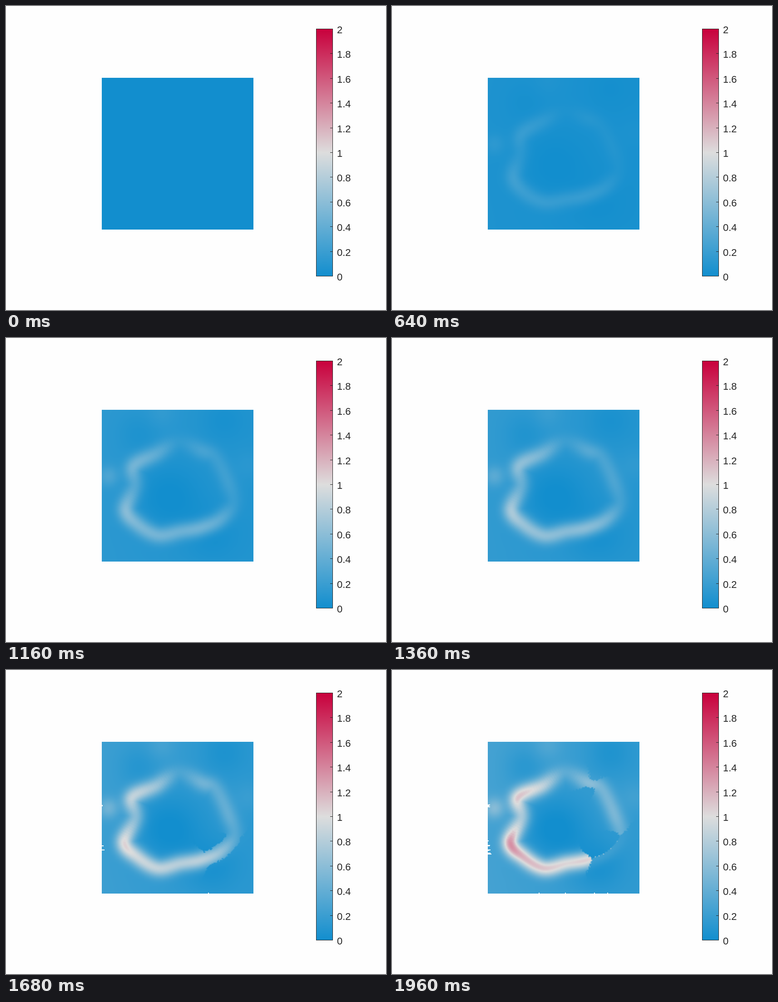
An HTML page with a canvas that plays this animation: 837x669 px, repeating every 2 s.

```html
<!DOCTYPE html>
<html lang="en">
<head>
<meta charset="utf-8">
<title>Field with colour scale</title>
<style>
  html, body { margin: 0; width: 100%; height: 100%; overflow: hidden; background: #fefefe; }
  #field { position: absolute; left: 211px; top: 158px; width: 334px; height: 334px; }
  svg { position: absolute; left: 0; top: 0; }
  text { font: 22px "Liberation Sans", Arial, sans-serif; fill: #262626; }
</style>
</head>
<body>
<canvas id="field" width="334" height="334"></canvas>
<svg width="837" height="669" viewBox="0 0 837 669">
  <defs>
    <linearGradient id="scale" x1="0" y1="1" x2="0" y2="0">
      <stop offset="0" stop-color="rgb(18,142,206)"/>
      <stop offset=".5" stop-color="rgb(221,221,221)"/>
      <stop offset="1" stop-color="rgb(200,0,60)"/>
    </linearGradient>
  </defs>
  <rect x="683.5" y="50.5" width="36" height="544" fill="url(#scale)" stroke="#262626"/>
  <g id="ticks" stroke="#262626"></g>
  <g id="labels"></g>
</svg>
<script>
const LOOP = 2000, STEP = 40, LAST = 1960;
const LEFT = 211, TOP = 158, SIZE = 334, CELLS = SIZE / 2;
const CENTRE = { x: 385, y: 340 };
const LOW = [18, 142, 206], MID = [221, 221, 221], HIGH = [200, 0, 60];
const SIGMA = 13.5, PER_NODE = 12;

// Key points of the ridge, clockwise from the top: x, y, final height
const ridge = [
  [380, 226, .38], [432, 248, .6], [462, 262, .5], [490, 318, .52], [502, 364, .45],
  [472, 400, .85], [430, 418, 1.06], [385, 426, 1.04], [335, 436, 1.12], [290, 412, 1.2],
  [261, 379, 1.34], [284, 325, .76], [278, 281, 1.12], [330, 255, .88]
];

// Broad rises and dips of the ground: x, y, radius, height
const bumps = [
  [355, 350, 56, -.22], [478, 182, 34, -.1], [452, 430, 42, -.13], [290, 212, 30, -.1],
  [343, 165, 22, .1], [226, 304, 16, .34], [535, 280, 24, .08]
];

// Stretches of the ridge that tear, in key point units, with the half width left over
const tears = [
  { from: 4, to: 5.75, start: 1600, end: 1800, left: 0 },
  { from: 1, to: 1.5, start: 1740, end: 1860, left: 9 }
];

const clamp = (v, a = 0, b = 1) => Math.min(b, Math.max(a, v));
const mix = (a, b, k) => a + (b - a) * k;
const ramp = (t, a, b) => clamp((t - a) / (b - a));
const fromCentre = (x, y) => Math.hypot(x - CENTRE.x, y - CENTRE.y);
const noise = n => { const v = Math.sin(n) * 437.58; return v - Math.floor(v); };
const jag = (x, y) => 4 * noise(Math.floor(x / 5) * 12.99 + Math.floor(y / 4) * 78.23) - 2;

function spline(a, b, c, d, k) {
  return b + .5 * k * (c - a + k * (2 * a - 5 * b + 4 * c - d + k * (3 * (b - c) + d - a)));
}

const cells = Array.from({ length: CELLS * CELLS }, (_, i) => {
  const x = LEFT + 2 * (i % CELLS) + 1, y = TOP + 2 * Math.floor(i / CELLS) + 1;
  const ground = bumps.reduce((sum, [bx, by, r, h]) =>
    sum + h * Math.exp(-((x - bx) ** 2 + (y - by) ** 2) / (2 * r * r)),
    mix(.25, .15, (x - LEFT) / SIZE));
  return { x, y, ground: Math.max(0, ground) };
});

// White marks gather on the left edge around two heights, with a few along the bottom
const marks = Array.from({ length: 20 }, (_, i) => {
  const [a, b, c, d] = [1, 2, 3, 4].map(k => noise(i * 7.3 + k * 31.7));
  const birth = 1320 + 600 * Math.sqrt(a), life = 160 + 500 * b;
  const spread = (c + d - 1) * 18, long = 2 + 8 * c * c;
  return i % 5 === 4
    ? { x: SIZE * (.25 + .7 * c), y: SIZE - 2, w: 2, h: 2, birth, life }
    : { x: 0, y: (i % 2 ? 144 : 232) + spread, w: long, h: 2, birth, life };
});

// The ridge starts out rounded and sharpens into its key points
function curveAt(t) {
  const n = ridge.length, round = .25 * (1 - ramp(t, 640, 1680));
  const nodes = ridge.map((p, i) => {
    const a = ridge[(i + n - 1) % n], b = ridge[(i + 1) % n];
    return p.map((v, m) => m < 2 ? mix(v, (a[m] + b[m]) / 2, round) : v);
  });
  return Array.from({ length: n * PER_NODE }, (_, i) => {
    const j = Math.floor(i / PER_NODE), k = (i % PER_NODE) / PER_NODE;
    const [a, b, c, d] = [n - 1, 0, 1, 2].map(o => nodes[(j + o) % n]);
    return a.map((_, m) => spline(a[m], b[m], c[m], d[m], k));
  });
}

// Share of the ridge left at distance d from its line, s along it
function intact(s, d, outside, x, y, t) {
  const torn = tears.some(({ from, to, start, end, left }) => {
    const beyond = Math.max(0, from - s, s - to);
    const half = mix(26, left, ramp(t, start, end)) + 60 * beyond;
    return t >= start && beyond < .5 && d + jag(x, y) > half;
  });
  return !torn ? 1 : outside ? .2 : 0;
}

const small = document.createElement("canvas");
small.width = small.height = CELLS;
const smallPen = small.getContext("2d");
const image = smallPen.createImageData(CELLS, CELLS);
const pen = document.getElementById("field").getContext("2d");

function paint(t) {
  const points = curveAt(t), n = points.length;
  const px = Float32Array.from(points, p => p[0]);
  const py = Float32Array.from(points, p => p[1]);
  const grow = (t / LAST) ** 1.6, rise = (t / LAST) ** 1.3;
  cells.forEach(({ x, y, ground }, i) => {
    let best = 1e9, at = 0;
    for (let j = 0; j < n; j++) {
      const dx = x - px[j], dy = y - py[j], q = dx * dx + dy * dy;
      if (q < best) { best = q; at = j; }
    }
    const outside = fromCentre(x, y) > fromCentre(px[at], py[at]);
    const share = Math.exp(-best / (2 * SIGMA * SIGMA)) *
      intact(at / PER_NODE, Math.sqrt(best), outside, x, y, t);
    const v = clamp(mix(ground * rise, points[at][2] * grow, share), 0, 2);
    const [from, to, k] = v < 1 ? [LOW, MID, v] : [MID, HIGH, v - 1];
    for (let c = 0; c < 3; c++) image.data[4 * i + c] = mix(from[c], to[c], k);
    image.data[4 * i + 3] = 255;
  });
  smallPen.putImageData(image, 0, 0);
  pen.drawImage(small, 0, 0, SIZE, SIZE);
  pen.fillStyle = "#fefefe";
  for (const { x, y, w, h, birth, life } of marks)
    if (t >= birth && t < birth + life)
      pen.fillRect(Math.round(x), Math.round(y), Math.round(w), h);
}

function add(parent, tag, attrs, text = "") {
  const el = document.createElementNS("http://www.w3.org/2000/svg", tag);
  for (const key in attrs) el.setAttribute(key, attrs[key]);
  el.textContent = text;
  document.getElementById(parent).append(el);
}
for (let i = 0; i <= 10; i++) {
  const y = Math.floor(594.5 - 54.4 * i) + .5;
  add("ticks", "path", { d: `M714 ${y}H719` });
  add("labels", "text", { x: 729, y: y + 9.5 }, String(i / 5));
}

const start = performance.now();
let shown = -1;
function tick() {
  const step = Math.floor(((performance.now() - start) % LOOP) / STEP);
  const t = step < 2 ? 0 : step * STEP;
  if (t !== shown) paint(shown = t);
  requestAnimationFrame(tick);
}
tick();
</script>
</body>
</html>
```
